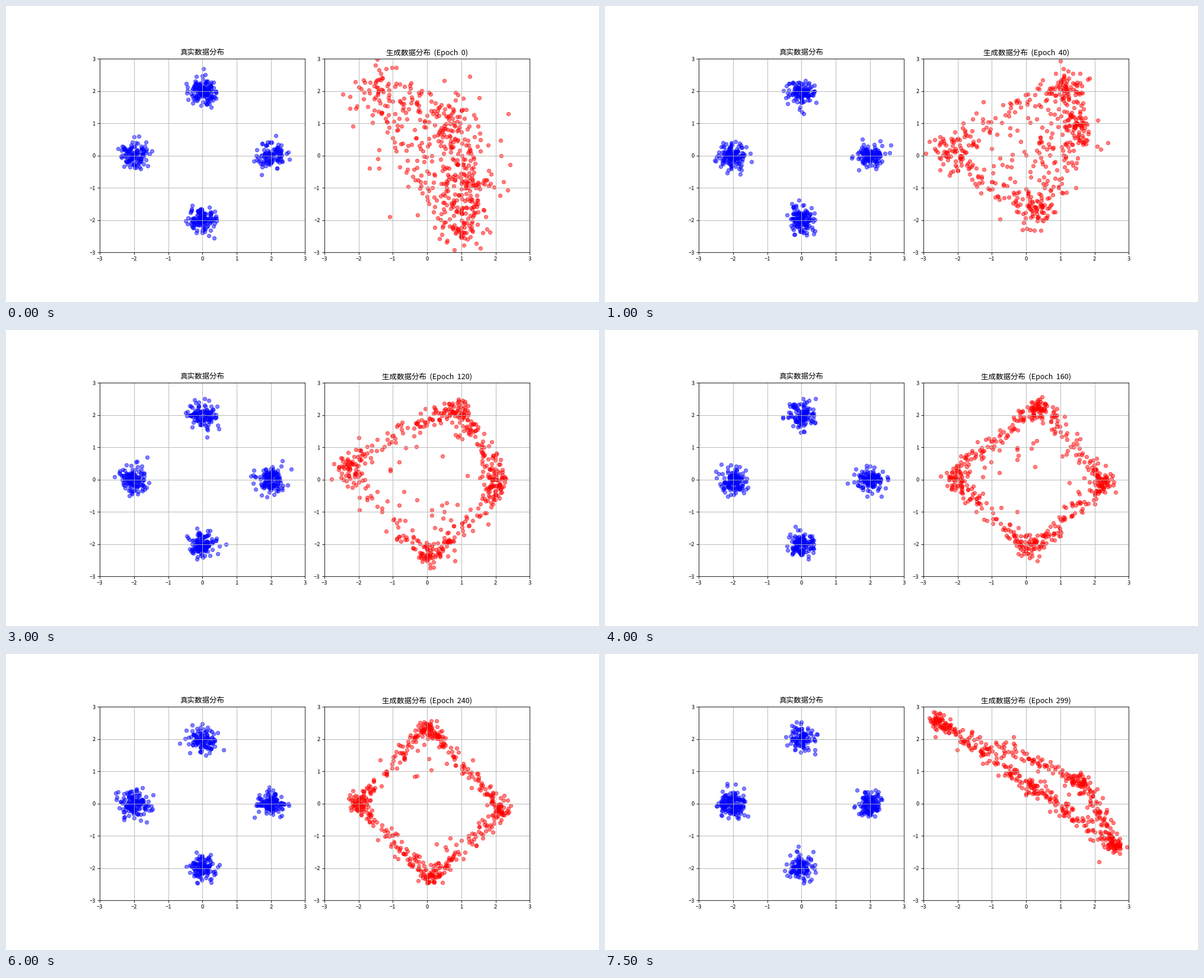
These frames come from a looping animation (1000 by 500 pixels, 8 s). A matplotlib script:

```python
import numpy as np
import matplotlib.pyplot as plt
from matplotlib.animation import FuncAnimation

plt.rcParams["font.family"] = ["Noto Sans CJK JP", "DejaVu Sans"]

DPI = 75
EPOCHS = list(range(0, 300, 20)) + [299]
SAMPLES = 512
CENTERS = np.array([(2, 0), (-2, 0), (0, 2), (0, -2)])

# Left, top, right and bottom corner of the generated ring at key epochs.
CORNERS = {
    0: [(-1.5, 2.0), (0.7, 1.2), (1.3, -0.9), (0.85, -2.3)],
    40: [(-2.3, 0.2), (1.2, 2.2), (1.5, 0.7), (0.35, -1.8)],
    80: [(-2.5, -0.2), (1.2, 2.1), (2.1, -0.5), (0.6, -2.1)],
    120: [(-2.4, 0.4), (0.8, 2.2), (2.1, -0.1), (0.1, -2.4)],
    160: [(-2.2, 0.1), (0.4, 2.3), (2.3, -0.1), (0.1, -2.2)],
    240: [(-2.05, 0), (0, 2.4), (2.2, -0.2), (0.1, -2.3)],
    299: [(-2.7, 2.6), (1.6, 0.7), (2.7, -1.4), (0.2, 0.5)],
}


def corners_at(epoch):
    keys = list(CORNERS)
    values = np.array(list(CORNERS.values())).reshape(len(keys), -1)
    return np.array([np.interp(epoch, keys, v) for v in values.T]).reshape(4, 2)


def real_points(rng):
    picks = CENTERS[rng.integers(4, size=SAMPLES)]
    return picks + rng.normal(0, 0.2, (SAMPLES, 2))


def fake_points(rng, epoch):
    """Sample a bowed ring that grows thinner and cleaner with training."""
    spread = 0.11 + 0.2 * np.exp(-epoch / 90)
    stray_share = 0.03 + 0.4 * np.exp(-epoch / 60)
    bulge = 0.2 * np.exp(-((epoch - 80) / 40) ** 2)

    corners = corners_at(epoch)
    center = corners.mean(axis=0)
    side = rng.integers(4, size=SAMPLES)
    t = rng.random((SAMPLES, 1))
    t = t * t * (3 - 2 * t)  # crowd the points at the corners
    ring = corners[side] * (1 - t) + corners[(side + 1) % 4] * t

    stray = rng.random((SAMPLES, 1)) < stray_share
    pull = np.where(stray, rng.uniform(0.4, 1.1, (SAMPLES, 1)), 1)
    scale = pull * (1 + bulge * np.sin(np.pi * t))
    noise = rng.normal(0, spread, (SAMPLES, 2)) * np.where(stray, 2, 1)
    return center + (ring - center) * scale + noise


def make_panel(left, color):
    ax = fig.add_axes([left, 0.1676, 0.3465, 0.654])
    ax.set(xlim=(-3, 3), ylim=(-3, 3),
           xticks=range(-3, 4), yticks=range(-3, 4))
    ax.tick_params(labelsize=9)
    ax.grid(True)
    return ax, ax.scatter([], [], c=color, alpha=0.5)


fig = plt.figure(figsize=(1000 / DPI, 500 / DPI), dpi=DPI)
real_ax, real_dots = make_panel(0.158, "blue")
fake_ax, fake_dots = make_panel(0.5368, "red")
real_ax.set_title("真实数据分布", fontsize=12)
fake_title = fake_ax.set_title("", fontsize=12)


def update(frame):
    rng = np.random.default_rng(100 + frame)
    epoch = EPOCHS[frame]
    real_dots.set_offsets(real_points(rng))
    fake_dots.set_offsets(fake_points(rng, epoch))
    fake_title.set_text(f"生成数据分布  (Epoch  {epoch})")
    return real_dots, fake_dots, fake_title


anim = FuncAnimation(fig, update, frames=len(EPOCHS), interval=500,
                     repeat=True, repeat_delay=0)
plt.show()
```
